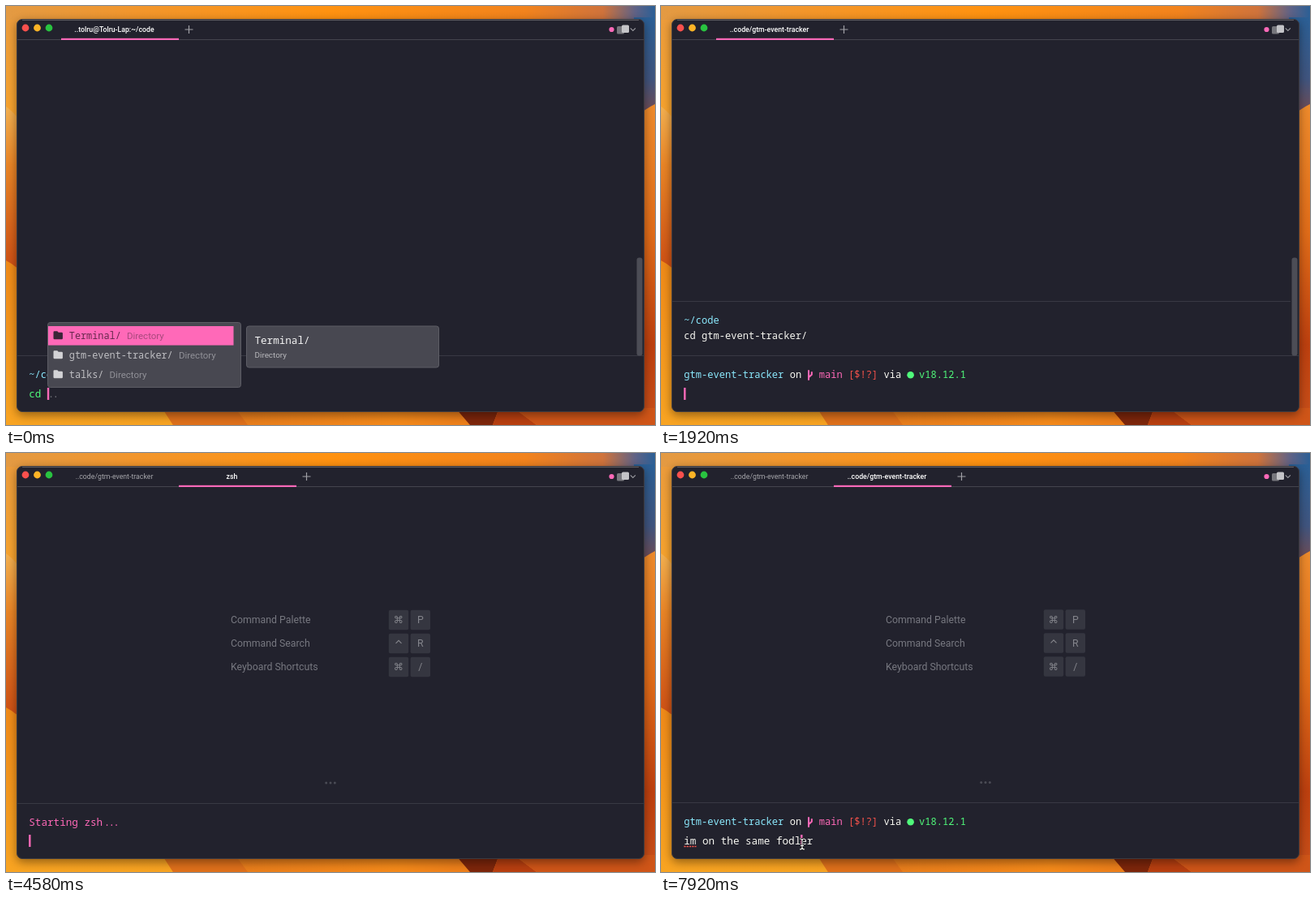
Write an HTML page that moves like this. It is 800 by 517 pixels and loops after 8 s.

```html
<!DOCTYPE html>
<html lang="en">
<head>
<meta charset="utf-8">
<title>Terminal session</title>
<style>
  html, body { margin: 0; width: 100%; height: 100%; overflow: hidden; background: #e8791c; }
  svg { display: block; width: 100vw; height: 100vh; }
  text { white-space: pre; }
  .mono { font-family: "Noto Sans Mono", "DejaVu Sans Mono", monospace; font-variant-ligatures: none; }
  .ui { font-family: Roboto, "Liberation Sans", sans-serif; }
  .key { font-family: Roboto, "DejaVu Sans", sans-serif; }
</style>
</head>
<body>
<svg viewBox="0 0 800 517" preserveAspectRatio="none">
  <defs>
    <linearGradient id="top"><stop offset="0" stop-color="#e39a43"/><stop offset=".2" stop-color="#f2962c"/><stop offset=".5" stop-color="#ff9210"/><stop offset=".8" stop-color="#f2831d"/><stop offset=".92" stop-color="#cf733c"/><stop offset=".97" stop-color="#5f6286"/><stop offset="1" stop-color="#2b5f95"/></linearGradient>
    <linearGradient id="left" x2="0" y2="1"><stop offset="0" stop-color="#ec9c3b"/><stop offset=".4" stop-color="#f7a32d"/><stop offset="1" stop-color="#f39a2a"/></linearGradient>
    <linearGradient id="leaf" x2="0" y2="1"><stop offset="0" stop-color="#f3b050"/><stop offset=".35" stop-color="#e98526"/><stop offset="1" stop-color="#cc4d14"/></linearGradient>
    <linearGradient id="low" x2="0" y2="1"><stop offset="0" stop-color="#f08a18"/><stop offset="1" stop-color="#f8a422"/></linearGradient>
    <linearGradient id="sky" x2="0" y2="1"><stop offset="0" stop-color="#2b5f95"/><stop offset=".6" stop-color="#40557f"/><stop offset="1" stop-color="#7a4a4c"/></linearGradient>
    <linearGradient id="right" x2="0" y2="1"><stop offset="0" stop-color="#ee8b2c"/><stop offset=".4" stop-color="#e06c19"/><stop offset=".75" stop-color="#bd400f"/><stop offset="1" stop-color="#c9501a"/></linearGradient>
    <linearGradient id="base"><stop offset="0" stop-color="#f39b25"/><stop offset=".3" stop-color="#e57a1c"/><stop offset=".6" stop-color="#f58a1a"/><stop offset="1" stop-color="#d8601a"/></linearGradient>
    <filter id="blur" x="-5%" y="-5%" width="110%" height="112%"><feGaussianBlur stdDeviation="6"/></filter>
  </defs>

  <rect width="800" height="517" fill="url(#base)"/>
  <rect width="800" height="60" fill="url(#top)"/>
  <rect y="17" width="40" height="300" fill="url(#left)"/>
  <path d="M0 124Q12 132 30 160V330H0Z" fill="url(#leaf)"/>
  <path d="M0 314Q12 320 30 338V480L195 500L206 517H0Z" fill="url(#low)"/>
  <path d="M195 500L206 517H298L284 498Z" fill="#df701b"/>
  <path d="M774 14H800V140H774Z" fill="url(#sky)"/>
  <path d="M774 138Q790 126 800 121V517H774Z" fill="url(#right)"/>
  <path d="M554 496L572 517H600L608 496Z" fill="#7d260b"/>
  <path d="M608 496L600 517H654L626 496Z" fill="#b83f10"/>
  <path d="M626 496L654 517H800V496Z" fill="#cf5518"/>
  <rect x="13" y="19" width="774" height="486" rx="8" fill="#000" opacity=".4" filter="url(#blur)"/>
  <rect x="13.5" y="16.5" width="773" height="484" rx="6.5" fill="#22222d" stroke="#3c3a40"/>
  <path d="M20 17.5H780" stroke="#5c5a60"/>
  <path d="M14 41.5H786" stroke="#44454e"/>
  <circle cx="24" cy="27" r="4.4" fill="#f9504d"/>
  <circle cx="38.5" cy="27" r="4.4" fill="#fdb426"/>
  <circle cx="53" cy="27" r="4.4" fill="#29c340"/>
  <circle cx="746.5" cy="29" r="3.1" fill="#ff69b8"/>
  <rect x="753" y="25" width="9" height="9.5" rx="1.5" fill="#77777d"/>
  <rect x="759" y="23.5" width="9" height="9.5" rx="1.5" fill="#c4c4c8"/>
  <path d="M769.7 27.3L772.8 30.4L775.9 27.3" fill="none" stroke="#9a9aa0" stroke-width="1.1"/>
  <g id="view"></g>
</svg>
<script>
const LOOP = 8000;
const C = { pink: '#ff69b8', cyan: '#8be9fd', green: '#50fa7b', red: '#f4524b', white: '#f8f8f2',
            out: '#c9c9cb', dir: '#56bcd4', ghost: '#74757c' };
const OUT = 12.07, INPUT = 12.63, CELL = INPUT * 0.6, X = 28.3;
const view = document.getElementById('view');

const rect = (x, y, w, h, fill, extra = '') =>
  `<rect x="${x}" y="${y}" width="${w}" height="${h}" fill="${fill}" ${extra}/>`;
const text = (x, y, str, size, fill, cls = 'mono', extra = '') =>
  `<text class="${cls}" x="${x}" y="${y}" font-size="${size}" fill="${fill}" ${extra}>${str}</text>`;
const line = (y, end = 776) => `<path d="M14 ${y}.5H${end}" stroke="#383943"/>`;
const caret = col => rect(X + col * CELL - 0.2, 471, 2.4, 15, C.pink);

const PATH = 'gtm-event-tracker';
const HOME_TITLE = '..tolru@Tolru-Lap:~/code', REPO_TITLE = '..code/' + PATH;
const FOLDERS = ['Terminal/', PATH + '/', 'talks/'];
const FILES = [
  ['CHANGELOG.md', 'LICENSE', 'README.md', 'api-extractor.json', 'babel.config.js'],
  ['commitlint.config.js', 'jest.config.js', 'jest.setup.js', 'lint-staged.config.js', 'node_modules'],
  ['package.json', 'prettier.config.js', 'release.config.js', 'rollup.config.js', 'scripts'],
  ['src', 'tsconfig.build.json', 'tsconfig.json', 'yarn.lock']
];
const DIRS = ['node_modules', 'scripts', 'src'];
const PHRASE = 'im on the same fodler';

function tabs(titles) {
  const last = titles.length - 1;
  const plus = 225.5 + 145 * last;
  return titles.map((s, i) => text(133.5 + 145 * i, 32.2, s, 8.75, i === last ? '#fff' : '#a5a5aa', 'ui',
      `text-anchor="middle" font-weight="${i === last ? 500 : 400}"`)).join('') +
    rect(68 + 145 * last, 39.8, 145, 2.2, C.pink) +
    `<path d="M${plus - 5} 29H${plus + 5}M${plus} 24V34" stroke="#a0a0a6" stroke-width="1.2"/>`;
}

function prompt(y) {
  const at = (col, str, fill) => text(X + col * OUT * 0.6, y, str, OUT, fill);
  return at(0, PATH, C.cyan) + at(18, 'on', C.white) +
    `<path d="M182 ${y - 10}V${y + 2.5}M182 ${y - 1}L185.8 ${y - 4.5}V${y - 8}" fill="none" stroke="${C.pink}" stroke-width="2"/>` +
    at(23, 'main', C.pink) + at(28, '[$!?]', C.red) + at(34, 'via', C.white) +
    `<circle cx="307.6" cy="${y - 4}" r="4.3" fill="${C.green}"/>` + at(40, 'v18.12.1', C.green);
}

const cdBlock = y => line(y) + text(X, y + 28, '~/code', OUT, C.cyan) +
  text(X, y + 47, `cd ${PATH}/`, OUT, C.white);

const lsBlock = y => line(y) + prompt(y + 28) + text(X, y + 47, 'ls', OUT, C.white) +
  FILES.map((col, i) => col.map((f, j) =>
    text(X + i * 22 * OUT * 0.6, y + 70 + j * 16, f, OUT, DIRS.includes(f) ? C.dir : C.out)).join('')).join('');

const scrollbar = () => rect(777.5, 310.5, 7, 121, '#4c4d56', 'rx="3"');

const folder = (y, fill) =>
  `<path d="M58.5 ${y - 4}q0-1.2 1.2-1.2h3.6l1.4 1.5h4q1.2 0 1.2 1.2v6q0 1.2-1.2 1.2h-9q-1.2 0-1.2-1.2z" fill="${fill}"/>`;

function popup(sel) {
  const y0 = 395 + 24 * sel;
  return rect(51.5, 390.5, 238, 80, '#484851', 'rx="3" stroke="#5d5d65"') +
    rect(52, y0, 228.5, 23.6, C.pink) +
    FOLDERS.map((f, i) => {
      const y = 406.5 + 24 * i, on = i === sel;
      return folder(y, on ? '#3c2538' : '#d2d2d5') +
        text(77.8, y + 4, f, 11.85, on ? '#65284c' : '#bfbfc3') +
        text(77.8 + (f.length + 1) * 7.11, y + 4, 'Directory', 11.5, on ? '#a8497d' : '#909097', 'ui');
    }).join('') +
    rect(296.5, y0, 237, 51, '#484851', 'rx="3" stroke="#5d5d65"') +
    text(306.5, y0 + 22, FOLDERS[sel], 12.6, '#f4f4f4') +
    text(306.5, y0 + 38.5, 'Directory', 9.9, '#b8b8bc', 'ui');
}

function key(x, y, ch) {
  const cx = x + 12.2;
  return rect(x, y, 24.4, 24.4, '#353640', 'rx="2"') + (ch === '^'
    ? `<path d="M${cx - 3.5} ${y + 12}l3.5-3.5l3.5 3.5" fill="none" stroke="#85868c" stroke-width="1.1"/>`
    : text(cx, y + 16.6, ch, 12.3, '#85868c', 'key', 'text-anchor="middle"'));
}

function welcome(dy) {
  const rows = [['Command Palette', '⌘', 'P'], ['Command Search', '^', 'R'], ['Keyboard Shortcuts', '⌘', '/']];
  return `<g transform="translate(0 ${dy})">` + rows.map(([label, a, b], i) => {
    const y = 193.3 + 29 * i;
    return text(277, y + 16.2, label, 12.3, '#777880', 'ui') + key(471.8, y, a) + key(498.6, y, b);
  }).join('') + [394.7, 400, 405.3].map(x => `<circle cx="${x}" cy="406.5" r="1.5" fill="#4b4c55"/>`).join('') + '</g>';
}

const input = (str, fill = C.white) => text(X, 482.6, str, INPUT, fill);

// The I-beam glides in and settles on the misspelled word.
function pointer(t) {
  if (t < 7250) return '';
  const p = Math.min(1, (t - 7250) / 330), k = (1 - p) ** 3;
  const x = 174 + 60 * k, y = 482.5 - 40 * k;
  const d = `M${x - 3} ${y - 6.5}q3 0 3 2v9q0 2-3 2M${x + 3} ${y - 6.5}q-3 0-3 2v9q0 2 3 2M${x - 2} ${y + 2}h4`;
  return `<path d="${d}" fill="none" stroke="#111" stroke-width="2.6"/><path d="${d}" fill="none" stroke="#fff" stroke-width="1.1"/>`;
}

const blink = (t, since) => (t - since) % 1000 < 500;

function firstTab(t) {
  if (t < 1670) {
    const bar = line(431, 786) + text(X, 459.2, '~/code', OUT, C.cyan);
    const picked = t >= 1340;
    let s = tabs([HOME_TITLE]) + bar + scrollbar() + input('cd', C.green);
    if (picked) return s + text(X + 3 * CELL, 482.6, PATH + '/', INPUT, C.white) + caret(21);
    s += text(X + 3 * CELL + 0.6, 482.6, '..', INPUT, C.ghost, 'mono', 'letter-spacing="-1.6"');
    return s + popup(t < 600 ? 0 : 1) + (t < 100 || (t >= 600 && t < 1100) ? caret(3) : '');
  }
  const listed = t >= 2580;
  const typed = listed ? 0 : t >= 2420 ? 2 : t >= 2250 ? 1 : 0;
  const since = listed ? 2580 : typed ? 2250 : 1670;
  return tabs([REPO_TITLE]) + (listed ? cdBlock(210) + lsBlock(277) : cdBlock(364)) +
    line(431, 786) + scrollbar() + prompt(459.2) + input('ls'.slice(0, typed), C.green) +
    (blink(t, since) ? caret(typed) : '');
}

function secondTab(t) {
  if (t < 4750) {
    return tabs([REPO_TITLE, 'zsh']) + welcome(0.5) + line(432, 786) +
      text(X, 460.2, 'Starting zsh', INPUT, C.pink) +
      text(X + 12 * CELL + 1.6, 460.2, '...', INPUT, C.pink, 'mono', 'letter-spacing="-1.9"') +
      (blink(t, 4170) ? caret(0) : '');
  }
  const n = Math.max(0, Math.min(PHRASE.length, Math.floor((t - 4850) / 96)));
  const end = 4850 + 96 * PHRASE.length;
  const clicked = t >= 7600;
  const on = clicked ? blink(t, 7600) : t < end ? true : blink(t, end);
  return tabs([REPO_TITLE, REPO_TITLE]) + welcome(0) + line(431, 786) + prompt(459.2) +
    input(PHRASE.slice(0, n)) +
    (n > 2 ? `<path d="M${X} 485.5h15.2" stroke="${C.red}" stroke-width="1.5" stroke-dasharray="2.3 1"/>` : '') +
    (n === 11 ? text(X + 11 * CELL, 482.6, 'cripts/', INPUT, C.ghost) : '') +
    (on ? caret(clicked ? 19 : n) : '') + pointer(t);
}

let shown = '';
function draw(now) {
  const t = now % LOOP;
  const next = t < 4170 ? firstTab(t) : secondTab(t);
  if (next !== shown) view.innerHTML = shown = next;
}

let start;
function tick(now) {
  start ??= now;
  draw(now - start);
  requestAnimationFrame(tick);
}
draw(0);
requestAnimationFrame(tick);
</script>
</body>
</html>
```
